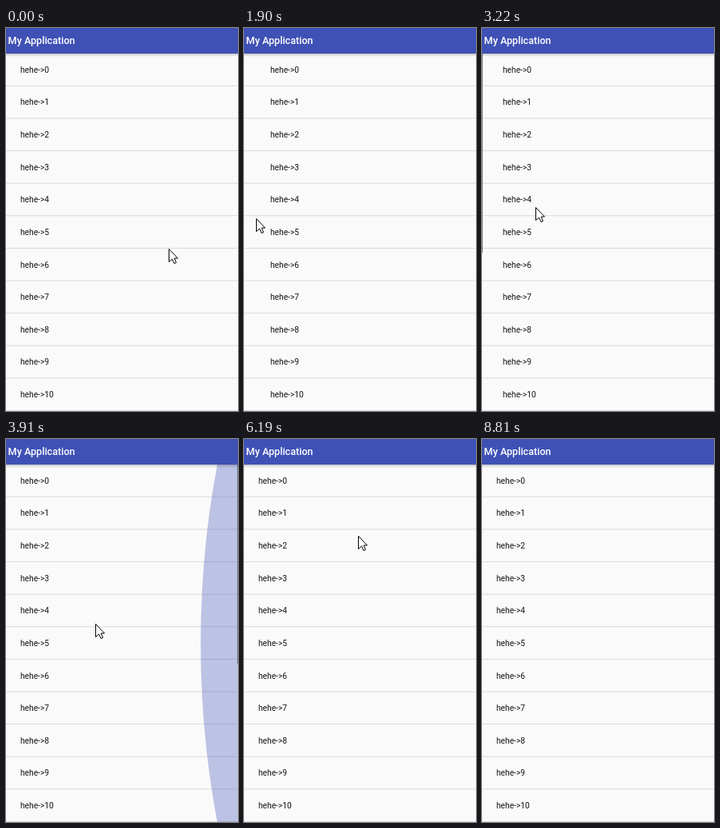
Recreate the animation shown at these times as an HTML page with a canvas. Size 291 by 479 pixels, loop 9210 ms.

```html
<!DOCTYPE html>
<html lang="en">
<head>
<meta charset="utf-8">
<title>Paged list</title>
<style>
  html, body { margin: 0; width: 100%; height: 100%; overflow: hidden; background: #fafafa; }
  canvas { display: block; width: 291px; height: 479px; }
</style>
</head>
<body>
<canvas id="stage" width="291" height="479"></canvas>
<script>
const W = 291, H = 479, BAR = 32, LOOP = 9210, STEP_MS = 135;
const ROWS = 11, PITCH = 40.62, PAGE = 298, PAGES = 3;
const PRIMARY = '#3f51b5';
const ctx = document.getElementById('stage').getContext('2d');

const clamp01 = v => Math.max(0, Math.min(1, v));
const mix = (a, b, u) => a + (b - a) * u;
const smooth = u => (1 - Math.cos(Math.PI * u)) / 2;

// Turning points of the pointer: step, x, y.
const swipes = [
  [0, 204, 276], [2, 105, 274], [4.5, 254, 272], [6, 245, 272], [10, 250, 258],
  [14, 15, 238], [20, 248, 228], [24, 67, 224], [27, 235, 230], [29, 112, 231],
  [34, 172, 255]
];
const waves = Array.from({ length: 5 }, (_, i) =>
  [42.75 + 3.25 * i, i % 2 ? 143 : 135, i % 2 ? 121 : 366]);
const exit = [[59, 139, 212], [65, 238, 475]];
const pointerStops = [...swipes, ...waves, ...exit];

function pointerAt(step) {
  const i = pointerStops.findIndex(stop => stop[0] > step);
  if (i < 0) return null;
  const [s0, x0, y0] = pointerStops[i - 1];
  const [s1, x1, y1] = pointerStops[i];
  const u = smooth((step - s0) / (s1 - s0));
  return [mix(x0, x1, u), mix(y0, y1, u)];
}

// One page turn, easing out cubically.
const pageTurn = (step, start) => PAGE * (1 - (1 - clamp01((step - start) / 6.35)) ** 3);

const scrollAt = step => pageTurn(step, 10) + pageTurn(step, 19.55);

// The glow swells while pulled, then recedes after the release.
function glowAt(step, start, release) {
  const pull = clamp01((step - start) / 2) * 0.625;
  if (pull === 0) return { size: 0, alpha: 0 };
  const fade = (1 - clamp01((step - release) / 4.45)) ** 2;
  const size = Math.max(0, 1 - 1 / (0.7 * Math.sqrt(124 * pull)));
  return { size: size * fade, alpha: 0.8 * pull * fade };
}

function drawList(scroll, barAlpha) {
  ctx.fillStyle = '#fafafa';
  ctx.fillRect(0, 0, W, H);

  ctx.fillStyle = '#dadada';
  for (let i = 0; i < ROWS; i++) ctx.fillRect(0, 71.8 + PITCH * i, W, 1);

  ctx.font = '10.25px Roboto, sans-serif';
  for (let page = 0; page < PAGES; page++) {
    const left = Math.round(page * PAGE - scroll);
    if (left <= -W || left >= W) continue;
    ctx.fillStyle = '#151515';
    for (let i = 0; i < ROWS; i++) {
      ctx.fillText('hehe->' + i, left + 17.9, 55.8 + PITCH * i);
    }
    if (page > 0) {
      ctx.fillStyle = `rgba(0,0,0,${barAlpha})`;
      ctx.fillRect(left + W - 1, BAR, 1, 249);
    }
  }
}

// Flattened circle whose cap bulges in from a side edge.
function drawGlow({ size, alpha }, fromRight) {
  if (size <= 0) return;
  const radius = 670.5, cap = 86;
  const squash = size * 58.5 / cap;
  const center = (cap - radius) * squash;
  ctx.globalAlpha = alpha;
  ctx.fillStyle = PRIMARY;
  ctx.beginPath();
  ctx.ellipse(fromRight ? W - center : center, (BAR + H) / 2,
    radius * squash, radius, 0, 0, Math.PI * 2);
  ctx.fill();
  ctx.globalAlpha = 1;
}

function drawHeader() {
  const shadow = ctx.createLinearGradient(0, BAR, 0, BAR + 4);
  shadow.addColorStop(0, 'rgba(0,0,0,0.2)');
  shadow.addColorStop(1, 'rgba(0,0,0,0)');
  ctx.fillStyle = shadow;
  ctx.fillRect(0, BAR, W, 4);
  ctx.fillStyle = PRIMARY;
  ctx.fillRect(0, 0, W, BAR);
  ctx.fillStyle = '#fff';
  ctx.font = '500 12.6px Roboto, sans-serif';
  ctx.fillText('My Application', 2.6, 20);
}

function drawPointer([x, y]) {
  ctx.save();
  ctx.translate(Math.round(x) + 0.5, Math.round(y) + 0.5);
  ctx.fillStyle = '#fff';
  ctx.strokeStyle = '#000';
  const arrow = new Path2D('M0 0V16L4 12.5L6.5 18L9 17L6.7 11.5H11Z');
  ctx.fill(arrow);
  ctx.stroke(arrow);
  ctx.restore();
}

function frame() {
  const step = Math.floor((performance.now() % LOOP) / STEP_MS + 0.23);
  drawList(scrollAt(step), 0.45 * (1 - clamp01((step - 32) / 4)));
  drawGlow(glowAt(step, 2.4, 4.53), false);
  drawGlow(glowAt(step, 27.68, 31), true);
  drawHeader();
  const pointer = pointerAt(step);
  if (pointer) drawPointer(pointer);
  requestAnimationFrame(frame);
}
frame();
</script>
</body>
</html>
```
